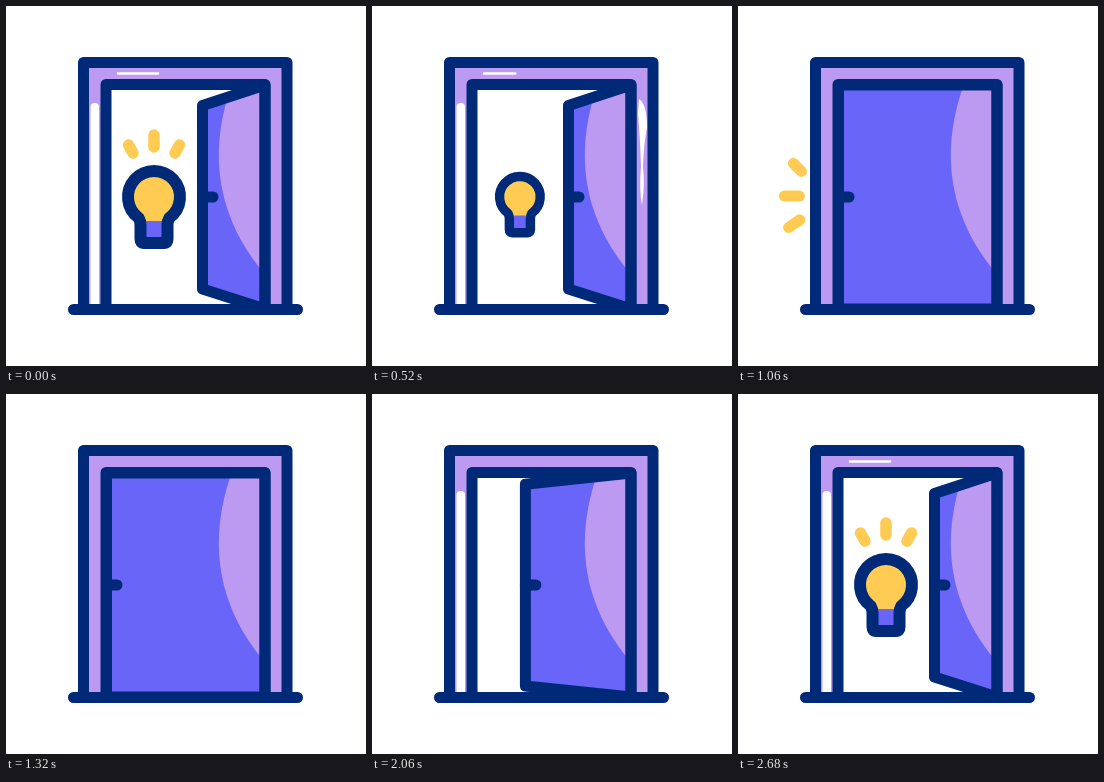
An HTML page with a canvas for the animation above (3.56 s loop, 360 px wide and 360 px high).

```html
<!DOCTYPE html>
<html>
<head>
<meta charset="utf-8">
<style>
html, body { margin: 0; width: 100%; height: 100%; overflow: hidden; background: #fff }
canvas { display: block; width: 100vmin; height: 100vmin }
</style>
</head>
<body>
<canvas id="stage"></canvas>
<script>
const NAVY = '#002a77', BLUE = '#6865f8', LILAC = '#bc9af2', YELLOW = '#ffcb52', WHITE = '#fff';
const LOOP = 3560;
const canvas = document.getElementById('stage');
const c = canvas.getContext('2d');
const ratio = window.devicePixelRatio || 1;
canvas.width = canvas.height = 360 * ratio;

const span = (t, a, b) => Math.min(1, Math.max(0, (t - a) / (b - a)));
const mix = (a, b, k) => a + (b - a) * k;
const inOut = u => u < .5 ? 2 * u * u : 1 - 2 * (1 - u) ** 2;
const outQuad = u => 1 - (1 - u) ** 2;
const outCubic = u => 1 - (1 - u) ** 3;

const frame = new Path2D('M77.5 303V56.5H281V303');
const jamb = new Path2D('M100 303V78.5H259V303');
const base = new Path2D('M67.5 303.5H291.5');
const shine = new Path2D('M226 78C205.5 135 203 205 262 272V78Z');
const bulb = new Path2D('M132.7 212A26 26 0 1 1 163.3 212Q161.5 215 161.5 219V233Q161.5 237 158 237' +
  'H138Q134.5 237 134.5 233V219Q134.5 215 132.7 212Z');
const taper = new Path2D('M267 93Q275 98 275 122Q272 135 271 160Q273 180 270 199Q267 185 269 160Q268 130 266 108Z');

// Each ray runs from its inner end to its outer end.
const bulbRays = [[127, 147, 122.5, 139], [148, 141, 148, 129], [169, 147, 173.5, 139]];
const knockRays = [[66.5, 168.5, 50.5, 152.5], [67, 190, 37.5, 190], [66, 211, 44, 226]];

function stroke(path, color = NAVY, width = 11) {
  c.strokeStyle = color;
  c.lineWidth = width;
  c.stroke(path);
}

function fill(path, color) {
  c.fillStyle = color;
  c.fill(path);
}

function line(x1, y1, x2, y2, color, width) {
  const p = new Path2D();
  p.moveTo(x1, y1);
  p.lineTo(x2, y2);
  stroke(p, color, width);
}

function ray([x1, y1, x2, y2], from, to, width = 11) {
  line(mix(x1, x2, from), mix(y1, y2, from), mix(x1, x2, to), mix(y1, y2, to), YELLOW, width);
}

function drawBulb(size) {
  if (size < .01) return;
  c.save();
  c.translate(147.5, 190);
  c.scale(size, size);
  c.translate(-147.5, -190);
  fill(bulb, YELLOW);
  c.fillStyle = BLUE;
  c.fillRect(135, 215, 26, 22);
  stroke(bulb, NAVY, 12);
  c.restore();
}

function drawDoor(open) {
  const x = mix(100.5, 196.5, open), top = mix(79, 99.5, open), bottom = mix(303, 283, open);
  const door = new Path2D(`M259 79L${x} ${top}V${bottom}L259 303Z`);
  fill(door, BLUE);
  c.save();
  c.clip(door);
  fill(shine, LILAC);
  c.restore();
  stroke(door);
  line(x, 191, x + 10.5, 191, NAVY, 11);
}

function drawGlints(t, open, size) {
  const top = mix(298, 97, span(open, 0, .5));
  c.fillStyle = WHITE;
  if (top < 297) {
    c.beginPath();
    c.roundRect(84.5, top, 8.5, 300 - top, [4, 4, 0, 0]);
    c.fill();
  }
  if (size > .05) line(112, 67.5, 112 + 40 * size, 67.5, WHITE, 2.5);
  if (t > 440 && t < 640) fill(taper, WHITE);
  if (t > 780 && t < 920) {
    line(269.5, 111, 269.5, 145, WHITE, 5);
    c.beginPath();
    c.ellipse(268, 230, 8, 20, 0, 0, 7);
    c.fill();
  }
}

function draw(t) {
  const open = t < 1400 ? 1 - inOut(span(t, 680, 1060)) : inOut(span(t, 1840, 2260));
  const size = t < 1400 ? 1 - span(t, 280, 680) ** 3 : outCubic(span(t, 2310, 2620));
  const glow = t < 1400 ? 1 - inOut(span(t, 280, 500)) : outQuad(span(t, 2460, 2680));

  c.setTransform(ratio, 0, 0, ratio, 0, 0);
  c.lineCap = c.lineJoin = 'round';
  c.fillStyle = WHITE;
  c.fillRect(0, 0, 360, 360);
  fill(frame, LILAC);
  fill(jamb, WHITE);
  drawGlints(t, open, size);

  if (glow > .01) bulbRays.forEach(r => ray(r, 1 - glow, 1, 11.5 * Math.min(1, glow * 3)));
  drawBulb(size);
  drawDoor(open);
  stroke(frame);
  stroke(jamb);
  stroke(base);

  if (t > 980 && t < 1320) {
    const head = outQuad(span(t, 980, 1160)), tail = span(t, 1000, 1320);
    const width = 11 * Math.min(1, span(t, 980, 1020), (1 - tail) * 4);
    knockRays.forEach(r => ray(r, Math.min(head, tail), head, width));
  }
}

const start = performance.now();
function tick(now) {
  draw(Math.max(0, now - start) % LOOP);
  requestAnimationFrame(tick);
}
draw(0);
requestAnimationFrame(tick);
</script>
</body>
</html>
```
